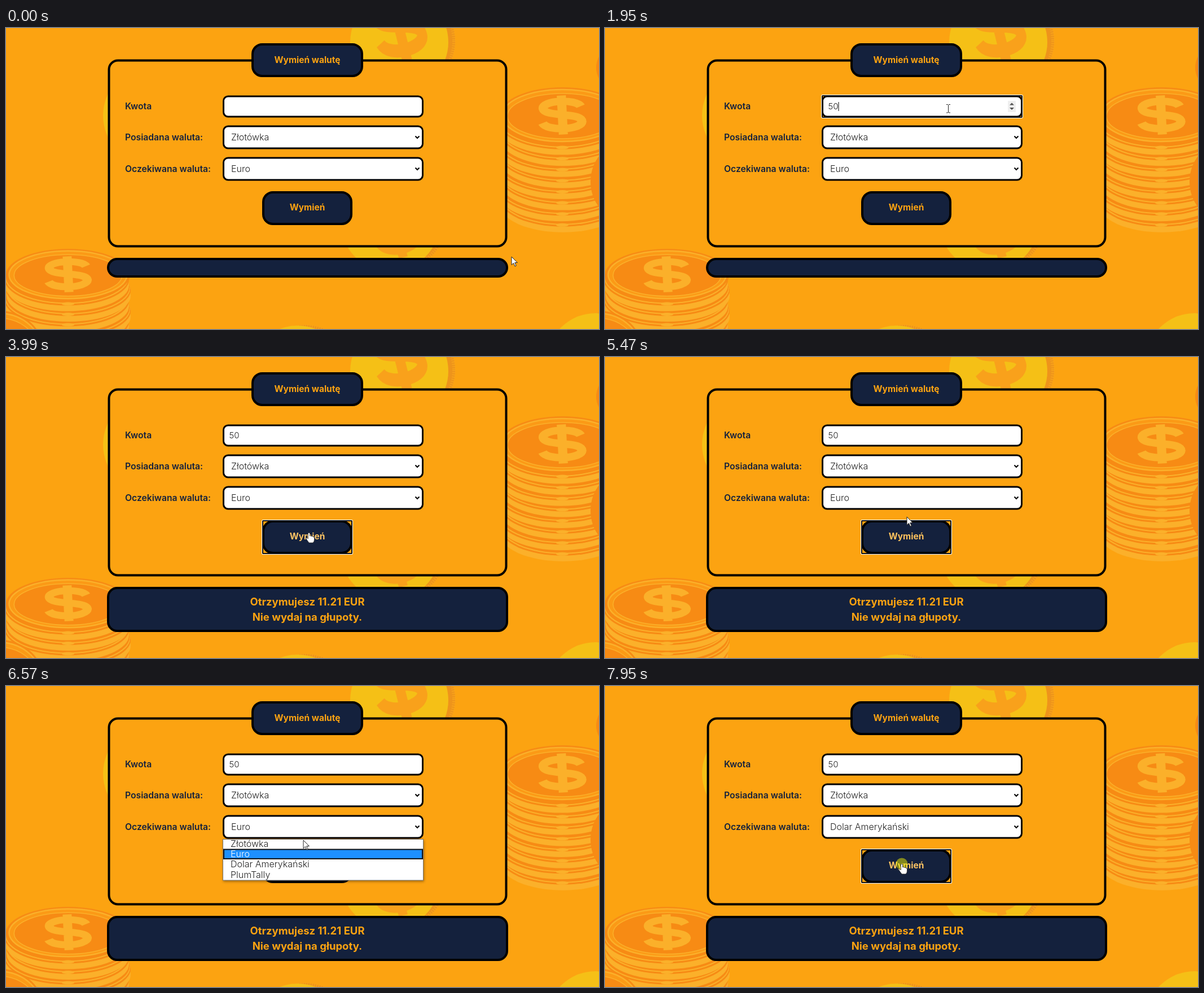
These frames come from a looping animation (1051x533 px, 8 s). An HTML page:

```html
<!DOCTYPE html>
<html lang="pl">
<head>
<meta charset="utf-8">
<title>Wymień walutę</title>
<style>
  html, body { margin: 0; width: 100%; height: 100%; overflow: hidden; background: #fca311; }
  svg { display: block; width: 1051px; height: 533px; font: 300 16px Inter, Lato, sans-serif; fill: #222; }
  .dark { fill: #14213d; stroke: #000; stroke-width: 4; }
  .panel { fill: #fca311; stroke: #000; stroke-width: 4; }
  .field { fill: #fff; stroke: #000; stroke-width: 3; }
  .label { font-weight: 600; font-size: 15.7px; fill: #14213d; }
  .gold { font-weight: 700; font-size: 15.5px; fill: #fca311; text-anchor: middle; }
  .big { font-size: 18.5px; }
  .chevron { fill: none; stroke: #000; stroke-width: 2; }
  .pointer path { fill: #fff; stroke: #222; stroke-width: 1; }
</style>
</head>
<body>
<svg viewBox="0 0 1051 533">
  <g id="money"></g>

  <rect class="panel" x="182.5" y="57.5" width="704" height="329" rx="16"/>
  <rect class="dark" x="437" y="29" width="194" height="56" rx="17"/>
  <text class="gold" x="534" y="62">Wymień walutę</text>

  <g class="label">
    <text x="211" y="143.5">Kwota</text>
    <text x="211" y="199">Posiadana waluta:</text>
    <text x="211" y="255">Oczekiwana waluta:</text>
  </g>
  <rect class="field" x="385.5" y="121" width="353" height="36" rx="8"/>
  <rect class="field" x="385.5" y="174" width="353" height="39" rx="8"/>
  <rect class="field" x="385.5" y="230" width="353" height="39" rx="8"/>
  <path class="chevron" d="M725.5 191.5l3.5 3.5 3.5-3.5M725.5 247.5l3.5 3.5 3.5-3.5"/>
  <text id="amount" x="395.5" y="143.5" font-size="15"></text>
  <rect id="caret" y="131" width="1" height="16" fill="#000"/>
  <g id="spinner">
    <rect x="714" y="129" width="14" height="20" fill="#efefef"/>
    <path d="M717 136.5l4-4 4 4zM717 141l4 4 4-4z" fill="#505050"/>
  </g>
  <text x="399" y="199">Złotówka</text>
  <text id="wanted" x="399" y="255"></text>

  <rect class="dark" x="456" y="291" width="156" height="56" rx="17"/>
  <text id="submit" class="gold" x="534" y="323">Wymień</text>

  <rect id="resultBox" class="dark" x="181" y="409" width="707" rx="16"/>
  <g id="result">
    <text class="gold big" x="534" y="440">Otrzymujesz 11.21 EUR</text>
    <text class="gold big" x="534" y="467">Nie wydaj na głupoty.</text>
  </g>

  <g id="ring" fill="none">
    <rect id="ringOut" stroke="#fff" rx="1.5"/>
    <rect id="ringIn" stroke="#101010" stroke-width="2" rx="1"/>
  </g>

  <g id="popup">
    <rect x="384.5" y="271.5" width="355" height="72.5" fill="#fff" stroke="#777"
      style="filter: drop-shadow(1px 2px 2px rgba(0,0,0,.35))"/>
    <rect id="pick" x="386" width="352" height="16.5" fill="#1e90ff" stroke="#101010" stroke-width="2"/>
    <g id="options"></g>
  </g>

  <circle id="click" r="10.5" fill="#f0f000" opacity=".5"/>
  <g id="pointer" class="pointer">
    <path id="arrow" d="M0 0V14.5L3.5 11.3L6 17L8.2 16L5.8 10.5H10.3Z"/>
    <path id="hand" transform="scale(.86)"
      d="M-2 1.5Q0-1.5 2 1.5V7Q4 5.5 5.5 7.5Q7.5 6.5 8.5 8.5Q11 8 11 11V15Q11 19 8 21H0Q-3 17-6 12.5Q-6 9.5-3.5 11L-2 12.5Z"/>
    <path id="beam" d="M-2 -6.5H0.5L1.5 -5.5L2.5 -6.5H5M1.5 -5.5V7M-2 8H0.5L1.5 7L2.5 8H5" style="fill:none"/>
  </g>
</svg>
<script>
const $ = id => document.getElementById(id);
const ORANGE = '#f78b14', LIGHT = '#fbb02a', AMBER = '#fb9a16', YELLOW = '#f5c016', RIM = '#ee941b';

const ellipse = (x, y, rx, ry, fill, extra = '') =>
  `<ellipse cx="${x}" cy="${y}" rx="${rx}" ry="${ry}" fill="${fill}" ${extra}/>`;

// Dollar sign drawn in a unit box, then placed and scaled
const dollar = (x, y, w, h, colour, turn = 0) =>
  `<path transform="translate(${x} ${y}) rotate(${turn}) scale(${w} ${h})" fill="none" stroke="${colour}" stroke-width=".38"
    d="M.78-.4C.6-.8-.85-.82-.78-.36C-.7.08.83-.1.8.4C.76.8-.65.82-.84.36M0-1V1"/>`;

const coin = (x, y, r) =>
  ellipse(x + 13, y - 2, r - 1, r - 1, RIM) +
  ellipse(x + 13, y - 2, r - 3, r - 3, 'none', 'stroke="#f9a51a" stroke-width="6" stroke-dasharray="1.5 2.5"') +
  ellipse(x, y, r, r, YELLOW);

function face(x, y, rx, ry) {
  return ellipse(x, y, rx, ry, ORANGE) +
    ellipse(x, y, rx * .95, ry * .92, AMBER, `stroke="${LIGHT}" stroke-width="2.5"`) +
    ellipse(x, y + 1, rx * .87, ry * .8, ORANGE, `stroke="${LIGHT}" stroke-width="1.5"`);
}

function stack(x, y, rx, ry, layers, pitch) {
  let out = '';
  for (let i = layers; i > 0; i--) {
    const cx = x + (i % 2 ? -2 : 1), cy = y + i * pitch;
    out += ellipse(cx, cy, rx, ry, LIGHT) +
      ellipse(cx, cy - 10, rx, ry, ORANGE) +
      ellipse(cx, cy - 13, rx - 1, ry, LIGHT) +
      ellipse(cx, cy - 15, rx - 2, ry, ORANGE) +
      ellipse(x, cy + ry - 13, 11, 3, LIGHT);
  }
  return out + face(x, y, rx, ry) + dollar(x, y - 1, rx * .38, ry * .69, LIGHT, -3);
}

$('money').innerHTML =
  coin(697, 25, 87) + dollar(696, -3, 46, 62, '#f9a11b', -14) +
  coin(260, 155, 88) +
  coin(681, 343, 88) + dollar(690, 350, 42, 58, '#f9a11b', -14) +
  coin(517, 615, 88) + coin(1045, 592, 87) +
  stack(986, 155, 112, 50, 8, 19.6) +
  ellipse(1110, 70, 64, 50, ORANGE) +
  ellipse(1092, 272, 56, 66, ORANGE) +
  stack(110, 437, 110, 46, 7, 18.5) +
  face(-15, 562, 78, 62);

const names = ['Złotówka', 'Euro', 'Dolar Amerykański', 'PlumTally'];
const ROW = 18.2;
$('options').innerHTML = names.map((n, i) => `<text x="398" y="${285 + i * ROW}">${n}</text>`).join('');

// Pointer path: time, x, y
const path = [
  [50, 896, 405], [830, 607, 142], [2480, 607, 142], [3300, 554, 253], [3660, 537, 311],
  [4590, 537, 311], [4600, 538, 311], [5080, 538, 311], [5090, 537, 310], [5240, 537, 310],
  [5470, 535, 283], [5800, 527, 253], [6400, 527, 253], [6560, 527, 273], [6620, 527, 273],
  [6850, 508, 314], [7550, 508, 314], [7900, 526, 315]
];
const clicks = [[740, 890], [3800, 3940], [6140, 6300], [7050, 7290], [7880, 8000]];

const ramp = (t, from, length) => Math.min(1, Math.max(0, (t - from) / length));
const show = (id, on) => $(id).style.display = on ? '' : 'none';
const within = (t, a, b) => t >= a && t < b;

function pointerAt(t) {
  const i = path.findIndex(p => p[0] > t);
  if (i < 0) return path[path.length - 1].slice(1);
  if (!i) return path[0].slice(1);
  const [t0, x0, y0] = path[i - 1], [t1, x1, y1] = path[i];
  const u = (t - t0) / (t1 - t0), e = u * u * (3 - 2 * u);
  return [x0 + (x1 - x0) * e, y0 + (y1 - y0) * e];
}

function placeRing(x, y, w, h) {
  const set = (id, d) => Object.entries({ x: x + d, y: y + d, width: w - 2 * d, height: h - 2 * d })
    .forEach(([k, v]) => $(id).setAttribute(k, v));
  set('ringOut', .5);
  set('ringIn', 2);
}

function draw(t) {
  const typing = within(t, 790, 3900), open = within(t, 6250, 7270), done = t >= 3900;
  const [x, y] = pointerAt(t);

  const text = t < 1530 ? '' : t < 1950 ? '5' : '50';
  $('amount').textContent = text;
  $('caret').setAttribute('x', [396, 404.5, 413.5][text.length]);
  show('caret', within(t, 790, 1360) || within(t, 1530, 2510) || within(t, 3020, 3530));
  show('spinner', typing);
  $('wanted').textContent = names[t < 7270 ? 1 : 2];

  const hover = ramp(t, 3480, 180) - ramp(t, 5450, 250) + ramp(t, 7270, 20);
  $('submit').style.fill = `rgb(${252 + hover}, ${163 + 34 * hover}, ${17 + 83 * hover})`;
  $('resultBox').setAttribute('height', done ? 76 : 31);
  show('result', done);

  show('ring', typing || within(t, 3900, 6160) || t >= 7270);
  if (typing) placeRing(383, 118, 358, 42);
  else if (within(t, 7270, 7920)) placeRing(383, 228, 358, 43);
  else placeRing(453, 288, 162, 62);

  show('popup', open);
  const row = t < 6600 ? 1 : Math.min(3, Math.max(0, Math.floor((y - 271) / ROW)));
  $('pick').setAttribute('y', 272 + row * ROW - (row ? .8 : 0));
  [...$('options').children].forEach((o, i) => o.style.fill = i === row ? '#fff' : '#222');

  show('click', clicks.some(([a, b]) => within(t, a, b)));
  $('click').setAttribute('cx', x);
  $('click').setAttribute('cy', y);
  const inInput = x > 384 && x < 740 && y > 120 && y < 158;
  const onButton = !open && x > 454 && x < 614 && y > 289 && y < 349;
  $('pointer').setAttribute('transform', `translate(${Math.round(x)} ${Math.round(y)})`);
  show('pointer', !within(t, 1530, 1720));
  show('beam', inInput);
  show('hand', onButton);
  show('arrow', !inInput && !onButton);
}

const start = performance.now();
function tick() {
  draw((performance.now() - start) % 8000);
  requestAnimationFrame(tick);
}
tick();
</script>
</body>
</html>
```
